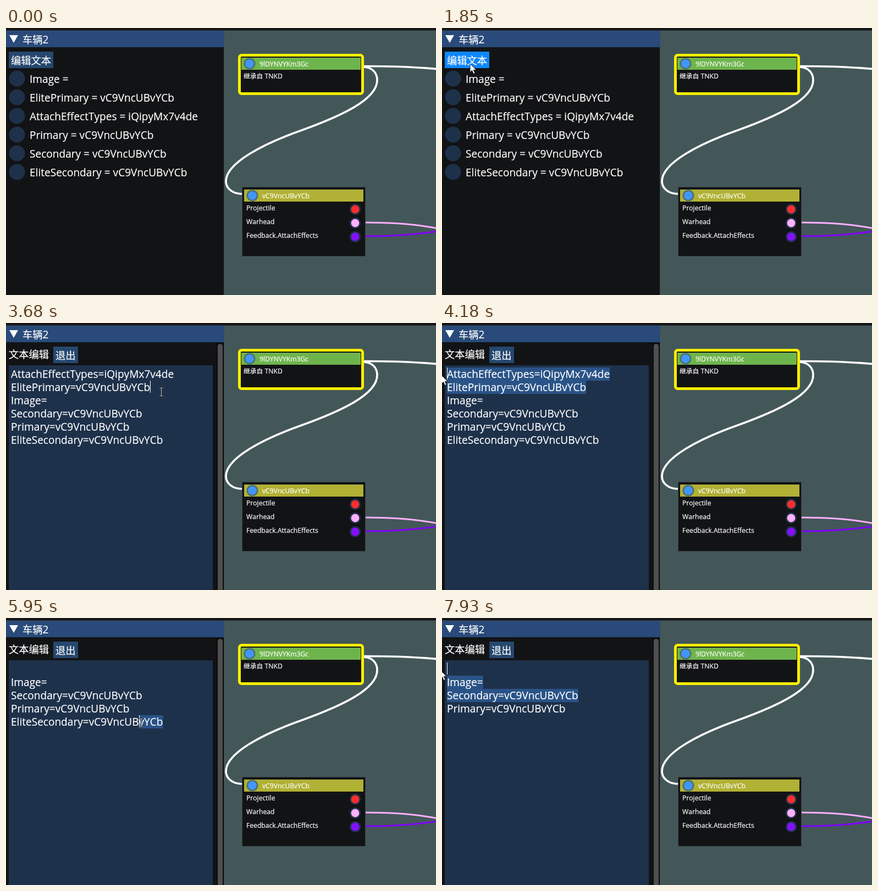
Recreate the animation shown at these times as an HTML page. Size 782x486 px, loop 7990 ms.

```html
<!DOCTYPE html>
<html lang="zh-CN">
<head>
<meta charset="utf-8">
<title>Node editor</title>
<style>
  html, body { margin: 0; width: 100%; height: 100%; overflow: hidden; background: #435759; }
  svg { display: block; width: 782px; height: 486px; }
  text {
    font: 19.07px "Open Sans", "Noto Sans", sans-serif;
    font-kerning: none;
    font-variant-ligatures: none;
    fill: #fff;
    stroke: #fff;
    stroke-width: .2;
    white-space: pre;
  }
  .cjk { font: 18.3px "Noto Sans CJK SC", "Noto Sans CJK", sans-serif; }
  .node text { font-size: 12.15px; }
  .node .cjk { font-size: 11.8px; }
  .wire { fill: none; stroke: #fff; stroke-width: 3.7; }
  .pink { stroke: #ffb0ff; stroke-width: 3; }
  .purple { stroke: #8000ff; stroke-width: 3; }
  .btn { fill: #26486f; }
  .btn.hover { fill: #4296fa; }
  .btn.down { fill: #0f87fa; }
  .dot { fill: #1e314b; }
  .dot.hover { fill: #26486f; }
  .port { fill: #4296fa; stroke: #50706c; stroke-width: 2.8; }
</style>
</head>
<body>
<svg viewBox="0 0 782 486">
  <rect width="782" height="486" fill="#435759"/>

  <path class="wire" d="M651 69.5C700 69.5 745 71 783 74.5"/>
  <path class="wire" d="M651 71C668 72 675 83 675 95C675 130 610 160 538 186C470 210 400 245 400 279C400 292 412 302 430 302"/>
  <path class="wire pink" d="M653 354C700 354 745 357 783 364.5"/>
  <path class="wire purple" d="M653 379C705 379 745 376 783 370"/>

  <g class="node">
    <rect x="424.5" y="49.5" width="224" height="70" rx="4" fill="#121315" stroke="#ffee00" stroke-width="5"/>
    <rect x="428" y="54" width="217" height="22" fill="#6eb44d"/>
    <circle class="port" cx="443" cy="65" r="9.2"/>
    <text x="461" y="70">9lDYNVYKm3Gc</text>
    <text x="432" y="92"><tspan class="cjk">继承自</tspan> TNKD</text>
  </g>

  <g class="node">
    <rect x="429.5" y="289.5" width="224" height="126" fill="#121315" stroke="#3a4247"/>
    <rect x="433" y="294" width="217" height="22" fill="#b1b135"/>
    <circle class="port" cx="448" cy="305" r="9.2"/>
    <text x="466" y="310">vC9VncUBvYCb</text>
    <text x="437" y="332">Projectile</text>
    <text x="437" y="357">Warhead</text>
    <text x="437" y="382">Feedback.AttachEffects</text>
    <g stroke="#1e314b" stroke-width="2.8">
      <circle cx="635" cy="330" r="8.8" fill="#ff2e2e"/>
      <circle cx="635" cy="355" r="8.8" fill="#ffb0ff"/>
      <circle cx="635" cy="380" r="8.8" fill="#8410ff"/>
    </g>
  </g>

  <rect width="396" height="486" fill="#121315"/>
  <rect x="396" y="5" width="1" height="481" fill="#3f4a50"/>
  <rect width="782" height="4" fill="#141416"/>
  <rect y="4" width="782" height="1" fill="#34393d"/>
  <rect y="5" width="397" height="30" fill="#294a7a"/>
  <path d="M6 13H22L14 27Z" fill="#fff"/>
  <text x="30" y="28"><tspan class="cjk">车辆</tspan>2</text>

  <g id="list">
    <rect id="edit" class="btn" x="5" y="43" width="81" height="30"/>
    <text class="cjk" x="9" y="66">编辑文本</text>
  </g>

  <g id="editor">
    <text class="cjk" x="5" y="63.5">文本编辑</text>
    <rect class="btn" x="86" y="43" width="45" height="30"/>
    <text class="cjk" x="90" y="66">退出</text>
    <rect x="5" y="77" width="371" height="409" fill="#1e314b"/>
    <rect x="383" y="36" width="13" height="450" fill="#0b0c0d"/>
    <rect x="385" y="38" width="9" height="460" rx="4.5" fill="#4f4f4f"/>
    <g id="marks" fill="#2a5387"></g>
    <g id="rows"></g>
    <rect id="caret" width="1" height="22" fill="#fff"/>
  </g>

  <path id="arrow" d="M0 0V15.5L3.6 12.2L6.3 18.5L9 17.3L6.3 11.2H11.2Z" fill="#fff" stroke="#000" stroke-width=".8"/>
  <g id="beam" fill="none">
    <path d="M-3 -7.5H3M0 -7.5V7.5M-3 7.5H3" stroke="#10151c" stroke-width="2.4"/>
    <path d="M-3 -7.5H-1L0 -6.5L1 -7.5H3M0 -6.5V6.5M-3 7.5H-1L0 6.5L1 7.5H3" stroke="#eee8d8"/>
  </g>
</svg>
<script>
const LOOP = 7990, LEFT = 9, TOP = 81, LINE = 24;
const OPEN = 1970, CUT1 = 4330, CUT2 = 6470;
const W = 'vC9VncUBvYCb';

const $ = id => document.getElementById(id);
const add = (parent, tag, attrs) => {
  const el = parent.appendChild(document.createElementNS('http://www.w3.org/2000/svg', tag));
  for (const k in attrs) el.setAttribute(k, attrs[k]);
  return el;
};
const show = (el, on) => { el.style.display = on ? '' : 'none'; };
const place = (el, x, y) => el.setAttribute('transform', `translate(${x} ${y})`);

// Property list
const props = ['Image = ', 'ElitePrimary = ' + W, 'AttachEffectTypes = iQipyMx7v4de',
  'Primary = ' + W, 'Secondary = ' + W, 'EliteSecondary = ' + W];
const dots = props.map((s, i) => {
  add($('list'), 'text', { x: 43, y: 100 + 34 * i }).textContent = s;
  return add($('list'), 'circle', { class: 'dot', cx: 20, cy: 92 + 34 * i, r: 14.5 });
});

// Text editor contents
const full = ['AttachEffectTypes=iQipyMx7v4de', 'ElitePrimary=' + W, 'Image=',
  'Secondary=' + W, 'Primary=' + W, 'EliteSecondary=' + W];
const cut1 = ['', ...full.slice(2)];
const cut2 = [...cut1.slice(0, 4), ''];
const linesAt = t => t < CUT1 ? full : t < CUT2 ? cut1 : cut2;
const rows = full.map((_, i) => add($('rows'), 'text', { x: LEFT, y: 100 + LINE * i }));
const marks = full.map((_, i) => add($('marks'), 'rect', { y: TOP + LINE * i, height: LINE }));

const ctx = document.createElement('canvas').getContext('2d');
ctx.font = '19.07px "Open Sans", "Noto Sans", sans-serif';
ctx.fontKerning = 'none';
const width = (s, n) => ctx.measureText(s.slice(0, n)).width;

// Pointer: time, x, y
const path = [
  [220, 279, 472], [710, 20, 136], [950, 20, 136], [1100, 14, 136], [1250, 14, 136],
  [1850, 51, 65], [2110, 51, 65], [2400, 206, 130], [2700, 67, 96], [2820, 17, 94],
  [2940, 17, 94], [3500, 292, 126], [3650, 292, 126], [4180, -1, 95], [4330, -1, 95],
  [5050, 252, 181], [5300, 340, 213], [5600, 305, 195], [5890, 246, 190], [5950, 245, 190],
  [6260, -1, 188], [6470, -1, 188], [6590, 163, 153], [6850, 302, 141], [6930, 302, 141],
  [7210, 72, 139], [7750, -3, 88], [7929, -3, 88], [7930, -3, 95], [LOOP, -3, 95]
];
function pointer(t) {
  const i = Math.max(1, path.findIndex(p => p[0] > t));
  const [t0, x0, y0] = path[i - 1], [t1, x1, y1] = path[i];
  const u = Math.max(0, (t - t0) / (t1 - t0));
  const e = (u + u * u * (3 - 2 * u)) / 2;
  return { x: x0 + (x1 - x0) * e, y: y0 + (y1 - y0) * e };
}

// Nearest caret position to a point
function hit({ x, y }, lines) {
  const row = Math.max(0, Math.min(lines.length - 1, Math.floor((y - TOP) / LINE)));
  const s = lines[row];
  let col = 0;
  while (col < s.length && x - LEFT > (width(s, col) + width(s, col + 1)) / 2) col++;
  return { row, col };
}

const drags = [[3600, CUT1], [5600, CUT2], [6900, LOOP]];

function drawEditor(t, p) {
  const lines = linesAt(t);
  rows.forEach((el, i) => { el.textContent = lines[i] || ''; });

  const drag = drags.find(d => t >= d[0] && t < d[1]);
  let caret = { row: t < CUT2 ? 0 : 4, col: 0 }, anchor = caret;
  if (drag) {
    caret = hit(p, lines);
    anchor = hit(pointer(drag[0]), lines);
  }
  const [a, b] = [anchor, caret].sort((m, n) => m.row - n.row || m.col - n.col);
  marks.forEach((el, i) => {
    const s = lines[i] || '';
    const from = i === a.row ? width(s, a.col) : 0;
    const to = i === b.row ? width(s, b.col) : width(s);
    el.setAttribute('x', LEFT + from);
    el.setAttribute('width', i >= a.row && i <= b.row ? Math.max(0, to - from) : 0);
  });
  show($('caret'), t >= drags[0][0]);
  $('caret').setAttribute('x', Math.round(LEFT + width(lines[caret.row], caret.col)));
  $('caret').setAttribute('y', TOP + LINE * caret.row);
}

function draw() {
  const t = performance.now() % LOOP;
  const p = pointer(t);
  const editing = t >= OPEN;
  show($('list'), !editing);
  show($('editor'), editing);

  if (editing) {
    drawEditor(t, p);
  } else {
    const over = p.x > 5 && p.x < 86 && p.y > 43 && p.y < 73;
    $('edit').setAttribute('class', 'btn' + (t >= 1850 ? ' down' : over ? ' hover' : ''));
    dots.forEach((el, i) =>
      el.classList.toggle('hover', t >= 220 && Math.hypot(p.x - 20, p.y - 92 - 34 * i) < 15));
  }

  const typing = editing && p.x > 5 && p.x < 376 && p.y > 77;
  show($('arrow'), t >= 220 && !typing);
  show($('beam'), typing);
  place($('arrow'), p.x, p.y);
  place($('beam'), Math.round(p.x) + .5, Math.round(p.y) + .5);
  requestAnimationFrame(draw);
}
draw();
</script>
</body>
</html>
```
